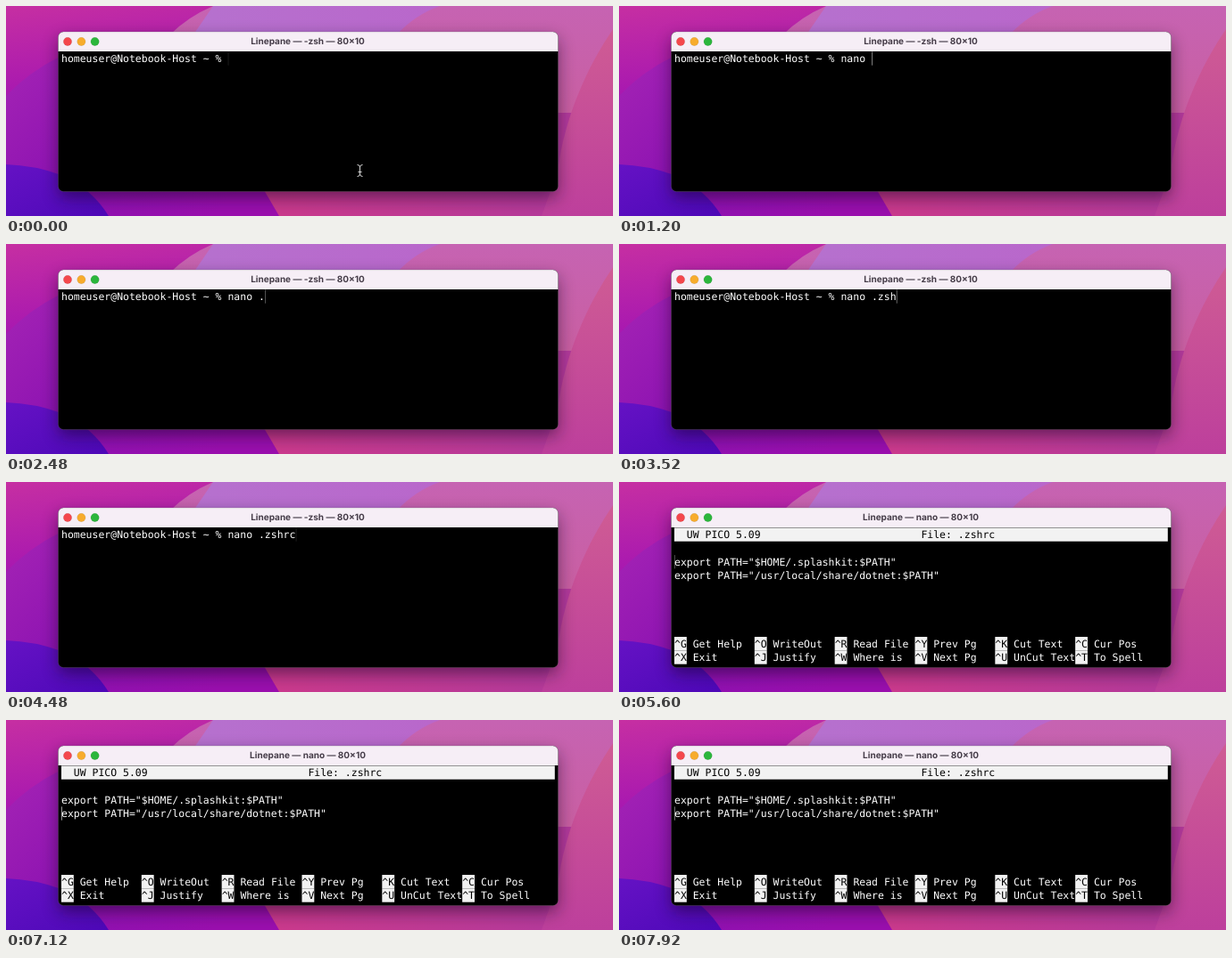
An HTML page that plays this animation: 680 by 236 pixels, repeating every 8000 ms.

```html
<!DOCTYPE html>
<html lang="en">
<head>
<meta charset="utf-8">
<title>Editing a shell profile</title>
<style>
  html, body { margin: 0; width: 100%; height: 100%; overflow: hidden; background: #000; }
  svg { display: block; width: 680px; height: 236px; }
  text { white-space: pre; text-rendering: geometricPrecision; }
  .mono { font: 11.48px "DejaVu Sans Mono", monospace; fill: #fff; }
  .mono .inv { fill: #000; }
  #title { font: 700 10px Inter, sans-serif; fill: #463d49; text-anchor: middle; }
</style>
</head>
<body>
<svg id="stage" viewBox="0 0 680 236">
  <defs>
    <linearGradient id="left" x1="0" y1="0" x2=".25" y2="1">
      <stop stop-color="#c62fa2"/><stop offset="1" stop-color="#a012b4"/>
    </linearGradient>
    <linearGradient id="purple" x1="0" y1="0" x2="1" y2=".6">
      <stop stop-color="#a524b4"/><stop offset=".5" stop-color="#8c12b2"/><stop offset="1" stop-color="#9a0fae"/>
    </linearGradient>
    <linearGradient id="blue" x1="0" y1="0" x2="1" y2="1">
      <stop stop-color="#6512c4"/><stop offset="1" stop-color="#4d08b8"/>
    </linearGradient>
    <linearGradient id="lilac" x1="0" y1="0" x2="1" y2="0">
      <stop stop-color="#b573cf"/><stop offset="1" stop-color="#b967cb"/>
    </linearGradient>
    <linearGradient id="pink" x1="0" y1="0" x2="0" y2="1">
      <stop stop-color="#c663b2"/><stop offset=".5" stop-color="#c95fa2"/><stop offset="1" stop-color="#b83c9c"/>
    </linearGradient>
    <linearGradient id="rose" x1="0" y1="0" x2="0" y2="1">
      <stop stop-color="#cf5c94"/><stop offset="1" stop-color="#bd3f9c"/>
    </linearGradient>
    <linearGradient id="floor" x1="0" y1="0" x2="1" y2="0">
      <stop stop-color="#cf3a8a"/><stop offset="1" stop-color="#b33a9c"/>
    </linearGradient>
    <filter id="blur" x="-20%" y="-30%" width="140%" height="160%"><feGaussianBlur stdDeviation="9"/></filter>
    <clipPath id="frame"><rect x="58.5" y="29" width="560" height="179.5" rx="6"/></clipPath>
  </defs>

  <rect width="680" height="236" fill="url(#pink)"/>
  <path d="M240 120H640V236H240Z" fill="url(#floor)"/>
  <path d="M680 26C650 70 626 125 618 186L600 236H680Z" fill="url(#rose)"/>
  <path d="M232 0H486Q458 10 438 32L300 120H150Z" fill="url(#lilac)"/>
  <path d="M0 0H232Q204 12 184 32L150 120H0Z" fill="url(#left)"/>
  <path d="M0 101Q26 74 60 57L200 60Q262 160 306 236H0Z" fill="url(#purple)"/>
  <path d="M0 178Q32 179 62 190Q96 205 115 236H0Z" fill="url(#blue)"/>

  <rect x="58" y="36" width="561" height="180" rx="8" fill="#180020" opacity=".5" filter="url(#blur)"/>
  <g clip-path="url(#frame)">
    <rect x="58" y="29" width="561" height="180"/>
    <rect x="58" y="29" width="561" height="22" fill="#f6eef6"/>
  </g>
  <rect x="58.5" y="29" width="560" height="179.5" rx="6" fill="none" stroke="#777" stroke-opacity=".4" stroke-width=".7"/>
  <g stroke-opacity=".15" stroke="#000" stroke-width=".5">
    <circle cx="69" cy="40" r="4.7" fill="#f4474c"/>
    <circle cx="84.4" cy="40" r="4.7" fill="#f7ac2d"/>
    <circle cx="99.6" cy="40" r="4.7" fill="#2cb63c"/>
  </g>
  <text id="title" x="338" y="43.4"></text>
  <g id="shell" class="mono"></g>
  <g id="editor" class="mono"></g>
  <rect id="caret" width="1" height="15.3" fill="#fff"/>
  <path id="mouse" d="M393.5 178.5Q396.5 178.5 396.5 181V189Q396.5 191.5 393.5 191.5M399.5 178.5Q396.5 178.5 396.5 181M396.5 189Q396.5 191.5 399.5 191.5M394.5 186.5H398.5" fill="none" stroke="#d8d8d8"/>
</svg>
<script>
const LOOP = 8000, LEFT = 62, CELL = 6.91, TOP = 51.4, ROW = 15.33;
const PROMPT = "homeuser@Notebook-Host ~ % ", COMMAND = "nano .zshrc";
const KEYS = [400, 560, 720, 880, 1040, 1680, 2720, 3000, 3280, 3560, 3880];
const ENTER = 5280, DOWN = 7040, BLINK = 1100;

const $ = id => document.getElementById(id);
const colX = col => LEFT + col * CELL;
const rowY = row => TOP + row * ROW;

function add(parent, tag, attrs, text = "") {
  const el = document.createElementNS("http://www.w3.org/2000/svg", tag);
  for (const key in attrs) el.setAttribute(key, attrs[key]);
  el.textContent = text;
  return parent.appendChild(el);
}

function write(parent, row, col, text, cls = "") {
  return add(parent, "text", { x: colX(col), y: rowY(row) + 11.5, class: cls }, text);
}

function invert(parent, row, col, cells) {
  add(parent, "rect", { x: colX(col), y: rowY(row), width: cells * CELL, height: ROW, fill: "#f2f2f2" });
}

const line = write($("shell"), 0, 0, PROMPT);

const editor = $("editor");
invert(editor, 0, 0, 80);
write(editor, 0, 2, "UW PICO 5.09", "inv");
write(editor, 0, 40, "File: .zshrc", "inv");
write(editor, 2, 0, 'export PATH="$HOME/.splashkit:$PATH"');
write(editor, 3, 0, 'export PATH="/usr/local/share/dotnet:$PATH"');
[
  ["G Get Help", "O WriteOut", "R Read File", "Y Prev Pg", "K Cut Text", "C Cur Pos"],
  ["X Exit", "J Justify", "W Where is", "V Next Pg", "U UnCut Text", "T To Spell"]
].forEach((items, i) => items.forEach((item, j) => {
  invert(editor, 8 + i, 13 * j, 2);
  write(editor, 8 + i, 13 * j, "^" + item[0], "inv");
  write(editor, 8 + i, 13 * j + 3, item.slice(2));
}));

function draw(t) {
  const typed = KEYS.filter(k => k <= t).length;
  const editing = t >= ENTER;
  const last = [-BLINK / 2, ...KEYS, ENTER, DOWN].filter(k => k <= t).pop();
  const glow = 0.36 + 0.26 * Math.cos((t - last) / BLINK * 2 * Math.PI);

  line.textContent = PROMPT + COMMAND.slice(0, typed);
  $("title").textContent = `Linepane — ${editing ? "nano" : "-zsh"} — 80×10`;
  $("shell").style.display = editing ? "none" : "";
  editor.style.display = editing ? "" : "none";
  $("mouse").style.display = typed ? "none" : "";

  const caret = $("caret");
  caret.setAttribute("x", editing ? LEFT : colX(PROMPT.length + typed));
  caret.setAttribute("y", rowY(editing ? (t < DOWN ? 2 : 3) : 0));
  caret.setAttribute("opacity", glow);
}

const start = performance.now();
function tick() {
  draw((performance.now() - start) % LOOP);
  requestAnimationFrame(tick);
}
tick();
</script>
</body>
</html>
```
